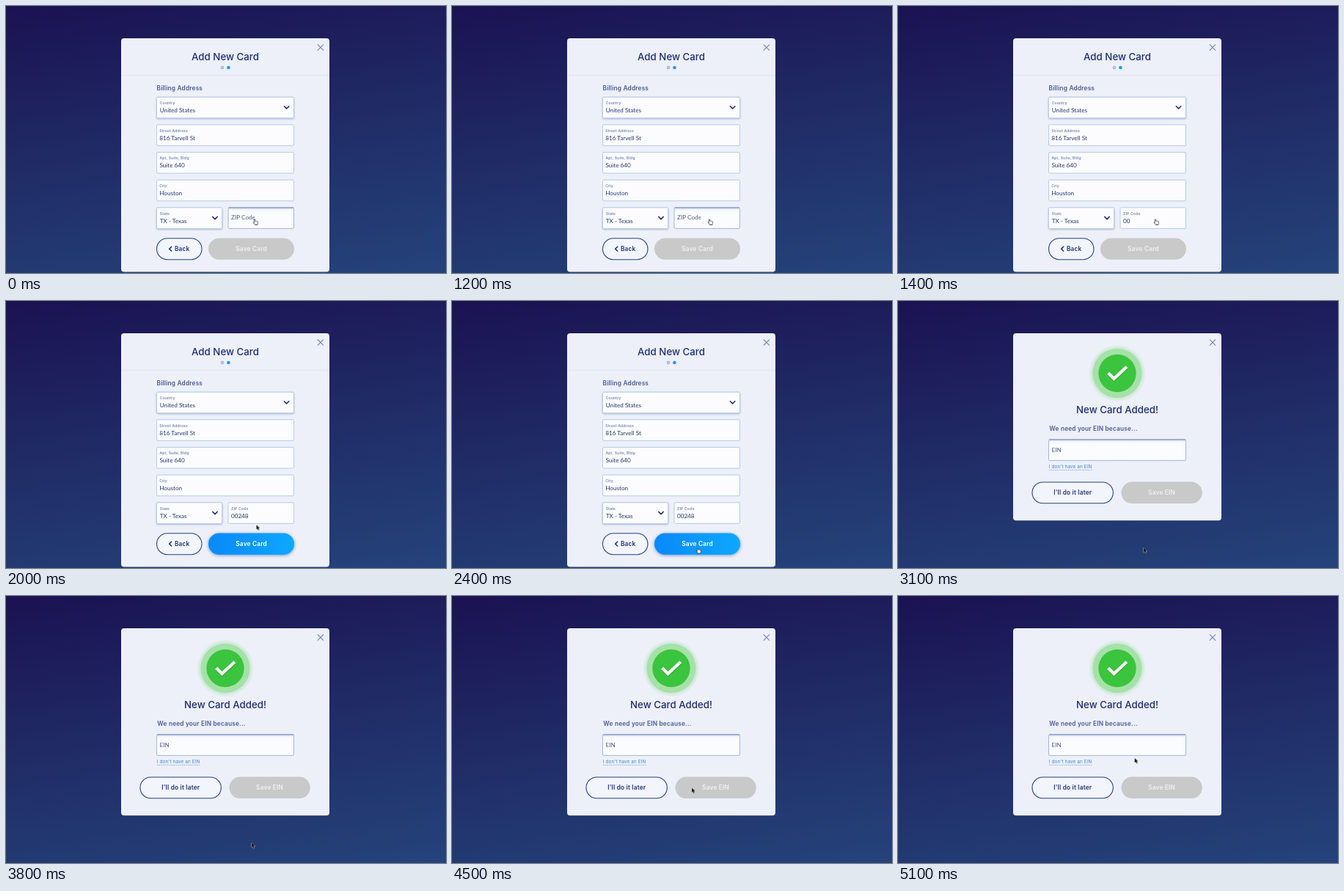
Animation of 600 by 364 pixels, one loop 5200 ms. Source, as an HTML page:

```html
<!DOCTYPE html>
<html lang="en">
<head>
<meta charset="utf-8">
<title>Add New Card</title>
<style>
  html, body { margin: 0; width: 100%; height: 100%; overflow: hidden; }
  body { background: linear-gradient(171deg, #1b1252 0%, #202c66 50%, #25437b 100%); }
  svg { display: block; width: 600px; height: 364px; }

  text { font-family: Inter, sans-serif; font-weight: 600; fill: #22347a; }
  .title { font-size: 13.3px; font-weight: 500; text-anchor: middle; fill: #1f2f72; }
  .lead { font-size: 8.3px; letter-spacing: .18px; fill: #4a5b94; }
  .label { font-size: 5px; letter-spacing: .2px; fill: #7484b2; }
  .value { font: 400 8.2px Lato, sans-serif; fill: #23376f; }
  .hint { fill: #4c5c88; }
  .link { font-size: 6.3px; font-weight: 400; letter-spacing: .15px; fill: #3f83cf; }
  .btn { font-size: 8.3px; letter-spacing: .2px; text-anchor: middle; }
  .light { fill: #f0f0f2; }
  .white { fill: #fff; }

  .card { fill: #edf0f9; }
  .field { fill: #fcfcfe; stroke: #b4cae6; }
  .select { filter: drop-shadow(0 1.5px 1px rgba(72, 100, 160, .4)); }
  .inset { fill: url(#inset); stroke: #a5b6d8; }
  .edge { stroke: #7f90bf; stroke-width: 1.2; }
  .outline { fill: #f3f5fc; stroke: #25417f; stroke-width: 1.1; }
  .off { fill: #c9c9ca; }
  .active { fill: url(#blue); filter: drop-shadow(0 1.5px 2px rgba(20, 85, 180, .6)); }
  .line { fill: none; stroke: #22387c; stroke-width: 1.6; stroke-linecap: round; stroke-linejoin: round; }
  .close { stroke: #7183bf; stroke-width: 1.1; }

  .form, .done, .empty, .filled, .digit, .save-off, .save-on, .hand, .arrow, .cursor {
    animation: 5200ms step-end infinite both;
  }
  .form { animation-name: form; }
  .done { animation-name: done; }
  .empty { animation-name: empty; }
  .filled { animation-name: filled; }
  .digit { animation-name: digit; animation-delay: calc(var(--i) * 100ms); }
  .save-off { animation-name: save-off; }
  .save-on { animation-name: save-on; }
  .hand { animation-name: hand; }
  .arrow { animation-name: arrow; }
  .cursor { animation-name: move; animation-timing-function: linear; }

  @keyframes form { 0% { opacity: 1 } 59.6%, 100% { opacity: 0 } }
  @keyframes done { 0% { opacity: 0 } 59.6%, 100% { opacity: 1 } }
  @keyframes empty { 0% { opacity: 1 } 24.99%, 100% { opacity: 0 } }
  @keyframes filled { 0% { opacity: 0 } 24.99%, 100% { opacity: 1 } }
  @keyframes digit { 0% { opacity: 0 } 24.99% { opacity: 1 } 60%, 100% { opacity: 0 } }
  @keyframes save-off { 0% { opacity: 1 } 32.69%, 100% { opacity: 0 } }
  @keyframes save-on { 0% { opacity: 0 } 32.69%, 100% { opacity: 1 } }
  @keyframes hand { 0% { opacity: 1 } 37.4% { opacity: 0 } 40.2% { opacity: 1 } 59.6%, 100% { opacity: 0 } }
  @keyframes arrow { 0% { opacity: 0 } 37.4% { opacity: 1 } 40.2% { opacity: 0 } 59.6%, 100% { opacity: 1 } }
  @keyframes move {
    0% { transform: translate(339px, 290.5px); animation-timing-function: ease-in-out }
    9.6%, 33.65% { transform: translate(351px, 290.5px); animation-timing-function: ease-in }
    38.46% { transform: translate(341.5px, 305px); animation-timing-function: ease-out }
    44.2%, 79.8% { transform: translate(335px, 336.4px); animation-timing-function: ease-in-out }
    91.3%, 100% { transform: translate(322.7px, 221px) }
  }
</style>
</head>
<body>
<svg viewBox="0 0 600 364">
  <defs>
    <linearGradient id="blue">
      <stop stop-color="#0989fb"/><stop offset="1" stop-color="#0da8ff"/>
    </linearGradient>
    <linearGradient id="inset" x2="0" y2="1">
      <stop stop-color="#d5dbea"/><stop offset=".14" stop-color="#fafbfe"/><stop offset="1" stop-color="#fcfcfe"/>
    </linearGradient>
    <radialGradient id="glow">
      <stop offset=".78" stop-color="#8fdc94" stop-opacity=".6"/><stop offset="1" stop-color="#8fdc94" stop-opacity="0"/>
    </radialGradient>
    <path id="chevron" class="line" d="M-3.2-1.6 0 1.6 3.2-1.6"/>
    <path id="close" class="close" d="M424.8 52.4l8.2 8.2m0-8.2l-8.2 8.2"/>
  </defs>

  <g class="form">
    <rect class="card" x="157" y="44" width="284" height="318.5" rx="4"/>
    <path d="M157 94.5h284" stroke="#e0e6f2"/>
    <use href="#close"/>
    <text class="title" x="299" y="73.5">Add New Card</text>
    <circle cx="295" cy="84" r="1.9" fill="#c8cee2" stroke="#8a97bd" stroke-width=".7"/>
    <circle cx="303.4" cy="84" r="2.3" fill="#1799f3"/>
    <text class="lead" x="205.5" y="115.3">Billing Address</text>

    <rect class="field select" x="205.5" y="124.2" width="187" height="28.6" rx="1.5"/>
    <text class="label" x="209.7" y="134">Country</text>
    <text class="value" x="209.7" y="144.9">United States</text>
    <use href="#chevron" x="382.6" y="138.3"/>

    <rect class="field" x="205.5" y="161.8" width="187" height="28.6" rx="1.5"/>
    <text class="label" x="209.2" y="171.7">Street Address</text>
    <text class="value" x="209.2" y="182.6">816 Tarvell St</text>

    <rect class="field" x="205.5" y="199.4" width="187" height="28.6" rx="1.5"/>
    <text class="label" x="209.4" y="209.4">Apt, Suite, Bldg</text>
    <text class="value" x="209.4" y="220.2">Suite 640</text>

    <rect class="field" x="205.5" y="237.1" width="187" height="28.6" rx="1.5"/>
    <text class="label" x="209.2" y="247">City</text>
    <text class="value" x="209.2" y="257.8">Houston</text>

    <rect class="field select" x="205.5" y="274.8" width="89.2" height="28.6" rx="1.5"/>
    <text class="label" x="209.7" y="284.6">State</text>
    <text class="value" x="209.7" y="295.5">TX - Texas</text>
    <use href="#chevron" x="285" y="289"/>

    <g class="empty">
      <rect class="field inset" x="303" y="274.8" width="89.5" height="28.6" rx="1.5"/>
      <path class="edge" d="M303.5 275h88.5"/>
      <text class="value hint" x="307" y="291.3">ZIP Code</text>
    </g>
    <g class="filled">
      <rect class="field" x="303" y="274.8" width="89.5" height="28.6" rx="1.5"/>
      <text class="label" x="307" y="284.6">ZIP Code</text>
      <g id="zip"></g>
    </g>

    <rect class="outline" x="205.5" y="316.7" width="61.5" height="29" rx="14.5"/>
    <path class="line" d="M225.6 328.2l-2.9 2.9 2.9 2.9"/>
    <text class="btn" x="240.2" y="334.1">Back</text>
    <g class="save-off">
      <rect class="off" x="276" y="316.4" width="117" height="29.4" rx="14.7"/>
      <text class="btn light" x="334.6" y="334.1">Save Card</text>
    </g>
    <g class="save-on">
      <rect class="active" x="276" y="316.4" width="117" height="29.4" rx="14.7"/>
      <text class="btn white" x="334.6" y="334.1">Save Card</text>
    </g>
  </g>

  <g class="done">
    <rect class="card" x="157" y="44" width="284" height="255.3" rx="4"/>
    <use href="#close"/>
    <circle cx="299" cy="98.5" r="39" fill="url(#glow)"/>
    <circle cx="299" cy="98.5" r="33.5" fill="#a6e1a8"/>
    <circle cx="299" cy="98.5" r="25.7" fill="#3bc43d"/>
    <g fill="none" stroke-width="4.2">
      <path d="M286.8 99.6l7.9 7.9 17.3-16.4" stroke="#2fa632"/>
      <path d="M286.6 98.2l7.9 7.9 17.3-16.4" stroke="#fff"/>
    </g>
    <text class="title" x="299" y="153.2">New Card Added!</text>
    <text class="lead" x="206.3" y="177.4">We need your EIN because...</text>
    <rect class="field inset" x="205.5" y="188.8" width="187" height="28.6" rx="1.5"/>
    <path class="edge" d="M206 189h186"/>
    <text class="value hint" x="209.5" y="205.5">EIN</text>
    <text class="link" x="205.8" y="227.8">I don't have an EIN</text>
    <path d="M206 230.4h58.5" stroke="#6ba5df" stroke-width=".8" stroke-dasharray="1.6 1"/>
    <rect class="outline" x="183" y="247" width="110.3" height="28.8" rx="14.4"/>
    <text class="btn" x="238.3" y="264.4">I'll do it later</text>
    <rect class="off" x="304.5" y="246.6" width="110.3" height="29.4" rx="14.7"/>
    <text class="btn light" x="359.6" y="264.4">Save EIN</text>
  </g>

  <g class="cursor" stroke-linejoin="round">
    <path class="arrow" d="M0 0v6.3l1.5-1.3 1.1 2.4 1.1-.5-1.1-2.3h2Z"
      fill="#111" stroke="#fff" stroke-width=".7" paint-order="stroke"/>
    <path class="hand" d="M-.7 4.9V.6q.8-1.1 1.5 0v2.2q.8-.5 1.4.2.8-.4 1.3.3.9-.3 1.1.6v1.5L3.8 7.6H.5L-1.9 4.6q.2-.9 1.2.3Z"
      fill="#fff" stroke="#222" stroke-width=".7"/>
  </g>
</svg>
<script>
  const zip = document.getElementById('zip');
  [...'00248'].forEach((digit, i) => {
    const el = document.createElementNS(zip.namespaceURI, 'text');
    el.setAttribute('class', 'value digit');
    el.setAttribute('x', 307 + i * 4.7);
    el.setAttribute('y', 295.5);
    el.style.setProperty('--i', i);
    el.textContent = digit;
    zip.append(el);
  });
</script>
</body>
</html>
```
